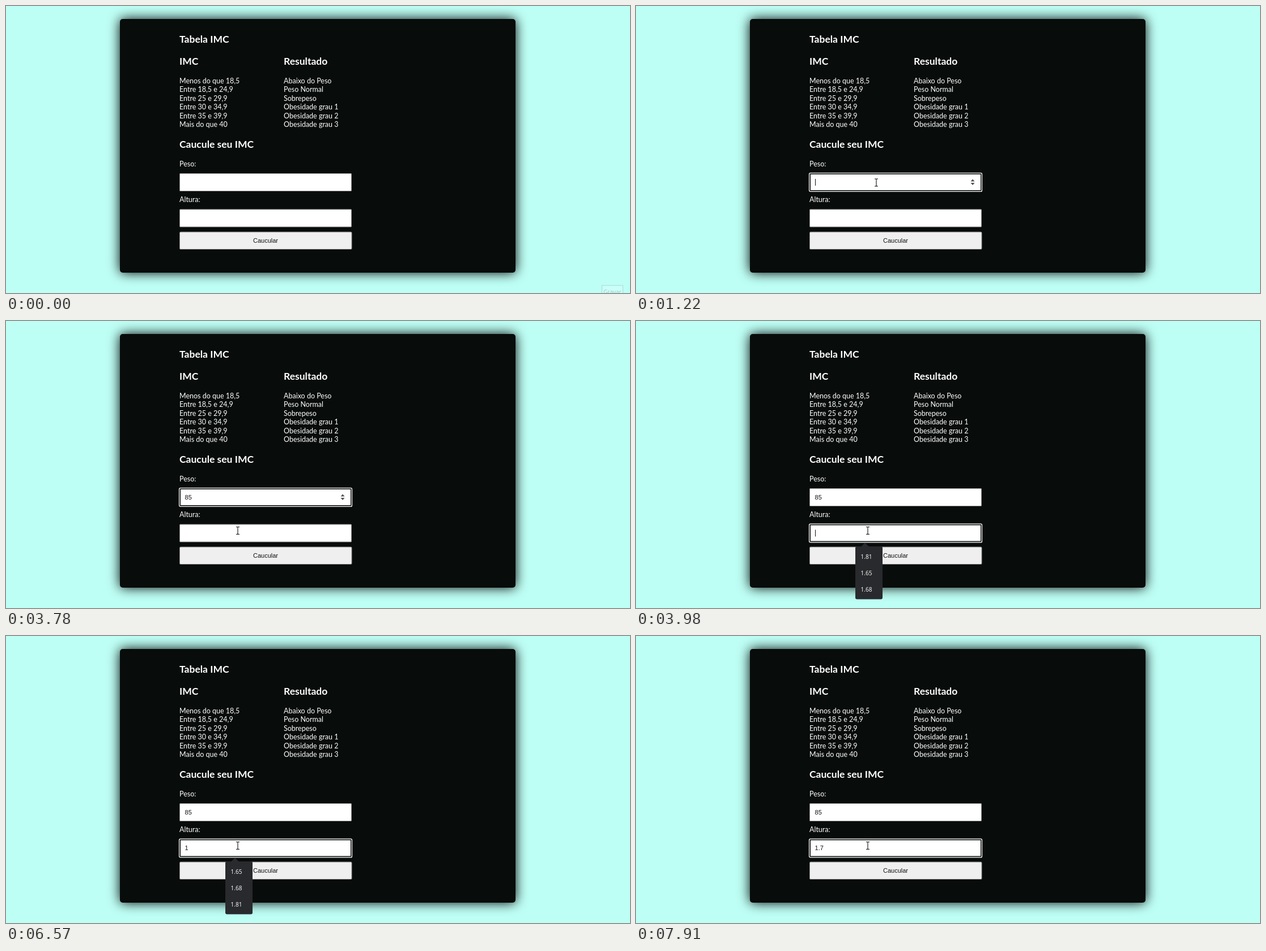
An HTML page that plays this animation: 1101 px wide and 508 px high, repeating every 8 s.

```html
<!DOCTYPE html>
<html lang="pt-BR">
<head>
<meta charset="utf-8">
<title>Tabela IMC</title>
<style>
  html, body { margin: 0; width: 100%; height: 100%; overflow: hidden; background: #befff5; }
  .panel {
    position: absolute; left: 201px; top: 23px; width: 698px; height: 449px;
    border-radius: 5px; background: #080c0b; box-shadow: 0 0 21px #000;
  }
  svg { position: absolute; left: 0; top: 0; }
  .copy { font: 12.5px Lato, sans-serif; fill: #fff; }
  .copy .title { font-size: 17.5px; font-weight: 700; }
  .form { font: 11px "Liberation Sans", Arial, sans-serif; fill: #111; }
  .list { font: 10.2px "Open Sans", "Noto Sans", sans-serif; fill: #fff; }
  .box { fill: #fff; stroke: #858585; }
</style>
</head>
<body>
<div class="panel"></div>
<svg width="1101" height="508" viewBox="0 0 1101 508">
  <g class="copy" id="copy"></g>

  <g class="form">
    <g class="field" transform="translate(306 296)">
      <rect class="box" x=".5" y=".5" width="303" height="31" rx="1"/>
      <g class="ring" fill="none">
        <rect x="1" y="1" width="302" height="30" rx="1" stroke="#101414" stroke-width="2"/>
        <rect x="-.4" y="-.4" width="304.8" height="32.8" rx="2" stroke="#fff" stroke-width="1.3"/>
      </g>
      <text class="value" x="9.6" y="19.7"></text>
      <rect class="caret" y="10" width="1" height="12"/>
      <path class="spin" d="M284.5 14.5l3.5-4 3.5 4zM284.5 17l3.5 4 3.5-4z" fill="#505050"/>
    </g>
    <g class="field" transform="translate(306 359.5)">
      <rect class="box" x=".5" y=".5" width="303" height="31" rx="1"/>
      <g class="ring" fill="none">
        <rect x="1" y="1" width="302" height="30" rx="1" stroke="#101414" stroke-width="2"/>
        <rect x="-.4" y="-.4" width="304.8" height="32.8" rx="2" stroke="#fff" stroke-width="1.3"/>
      </g>
      <text class="value" x="9.6" y="19.7"></text>
      <rect class="caret" y="10" width="1" height="12"/>
      <path class="spin" d="M284.5 14.5l3.5-4 3.5 4zM284.5 17l3.5 4 3.5-4z" fill="#505050"/>
    </g>
    <rect id="button" x="306.5" y="400" width="303.5" height="30.5" rx="1.5" stroke="#858585"/>
    <text x="458" y="419" text-anchor="middle">Caucular</text>
  </g>

  <g class="list" id="list">
    <path d="M397 399.5l7-7 7 7z" fill="#292a2d"/>
    <rect x="387" y="399" width="48" height="93.5" rx="3" fill="#292a2d"/>
    <text x="396.5" y="420.5"></text>
    <text x="396.5" y="449.7"></text>
    <text x="396.5" y="478.9"></text>
  </g>

  <g id="record">
    <rect x="1051.5" y="494.5" width="37" height="20" fill="#cbfff8" stroke="#a5dcd5"/>
    <text x="1070" y="510" text-anchor="middle" font-family="'Open Sans', sans-serif" font-size="10" fill="#98c9c3">Gravar</text>
  </g>

  <path id="arrow" d="M.5.5v15l3.5-3.3 2.5 5.6 2.4-1-2.4-5.5h4.7z" fill="#fff" stroke="#111" stroke-width=".8"/>
  <path id="beam" d="M-3-6.5h2.2l.8.7.8-.7h2.2M0-6v12M-3 6.5h2.2l.8-.7.8.7h2.2" fill="none" stroke="#111" stroke-width="1.1"/>
</svg>
<script>
const LOOP = 8000;
const $ = id => document.getElementById(id);
const show = (el, on) => { el.style.display = on ? '' : 'none'; };

// Static copy: x, first baseline, line step, lines
function write(x, y, step, lines, title) {
  lines.forEach((line, i) => {
    const el = document.createElementNS('http://www.w3.org/2000/svg', 'text');
    el.setAttribute('x', x);
    el.setAttribute('y', y + i * step);
    if (title) el.setAttribute('class', 'title');
    el.textContent = line;
    $('copy').append(el);
  });
}
write(306, 65, 39, ['Tabela IMC', 'IMC'], true);
write(490, 104, 0, ['Resultado'], true);
write(306, 251, 0, ['Caucule seu IMC'], true);
write(306, 136.5, 15.5, ['Menos do que 18,5', 'Entre 18,5 e 24,9', 'Entre 25 e 29,9',
  'Entre 30 e 34,9', 'Entre 35 e 39,9', 'Mais do que 40']);
write(490, 136.5, 15.5, ['Abaixo do Peso', 'Peso Normal', 'Sobrepeso',
  'Obesidade grau 1', 'Obesidade grau 2', 'Obesidade grau 3']);
write(306, 284, 63.3, ['Peso:', 'Altura:']);

// Each track holds [start time, value...] rows with hard changes
const pointer = [
  [260, 825, 445], [330, 803, 441], [400, 741, 430], [470, 660, 414],
  [540, 578, 402], [610, 508, 370], [680, 458, 355], [740, 434, 344],
  [810, 428, 331], [880, 426, 321], [950, 424, 315], [1020, 424, 312.5],
  [3300, 423, 315], [3370, 420, 326], [3440, 416, 340], [3510, 412, 354],
  [3580, 410, 364], [3650, 409, 369], [3720, 409, 371]
];
const focus = [[0, -1], [1150, 0], [3850, 1]];
const weight = [[0, ''], [2150, '8'], [3090, '85']];
const height = [[0, ''], [5960, '1'], [6770, '1.'], [7300, '1.7']];
const caret = [[0, 0], [1150, 1], [1680, 0], [2150, 1], [2680, 0], [3090, 1], [3620, 0],
  [3850, 1], [4440, 0], [4900, 1], [5430, 0], [5960, 1], [6570, 0], [6770, 1], [7910, 0]];
const listAlpha = [[0, 0], [3850, 1], [7300, .95], [7370, .83], [7440, .5], [7510, .2], [7580, 0]];
const options = [[0, '1.81 1.65 1.68'], [6090, '1.65 1.68 1.81']];

const at = (track, t) => track.findLast(row => row[0] <= t);
const inside = (x, y, top, bottom) => x >= 306 && x <= 610 && y >= top && y <= bottom;

const fields = [...document.querySelectorAll('.field')].map((el, i) => ({
  ring: el.querySelector('.ring'), value: el.querySelector('.value'),
  caret: el.querySelector('.caret'), spin: el.querySelector('.spin'),
  track: [weight, height][i], top: [296, 359.5][i]
}));
const listRows = $('list').querySelectorAll('text');

function draw(t) {
  const [, x, y] = at(pointer, t) || [0, -50, -50];
  const active = at(focus, t)[1];
  let overField = false;

  fields.forEach((f, i) => {
    const hover = inside(x, y, f.top, f.top + 32);
    const text = at(f.track, t)[1];
    overField ||= hover;
    f.value.textContent = text;
    f.caret.setAttribute('x', 10 + Math.floor(text.replace('.', '').length * 6.1 + text.includes('.') * 3 - .4 * !!text));
    show(f.caret, active === i && at(caret, t)[1]);
    show(f.ring, active === i);
    // Spinners yield to the open suggestion list
    show(f.spin, i === 0 && (hover || active === i) || i === 1 && hover && t < 3000);
  });

  $('button').setAttribute('fill', inside(x, y, 400, 431) ? '#e5e5e5' : '#efefef');
  $('list').style.opacity = at(listAlpha, t)[1];
  at(options, t)[1].split(' ').forEach((s, i) => { listRows[i].textContent = s; });
  show($('record'), t < 70);

  show($('arrow'), !overField);
  show($('beam'), overField);
  for (const id of ['arrow', 'beam']) $(id).setAttribute('transform', `translate(${x} ${y})`);
}

const start = performance.now();
function tick() {
  draw((performance.now() - start) % LOOP);
  requestAnimationFrame(tick);
}
draw(0);
requestAnimationFrame(tick);
</script>
</body>
</html>
```
